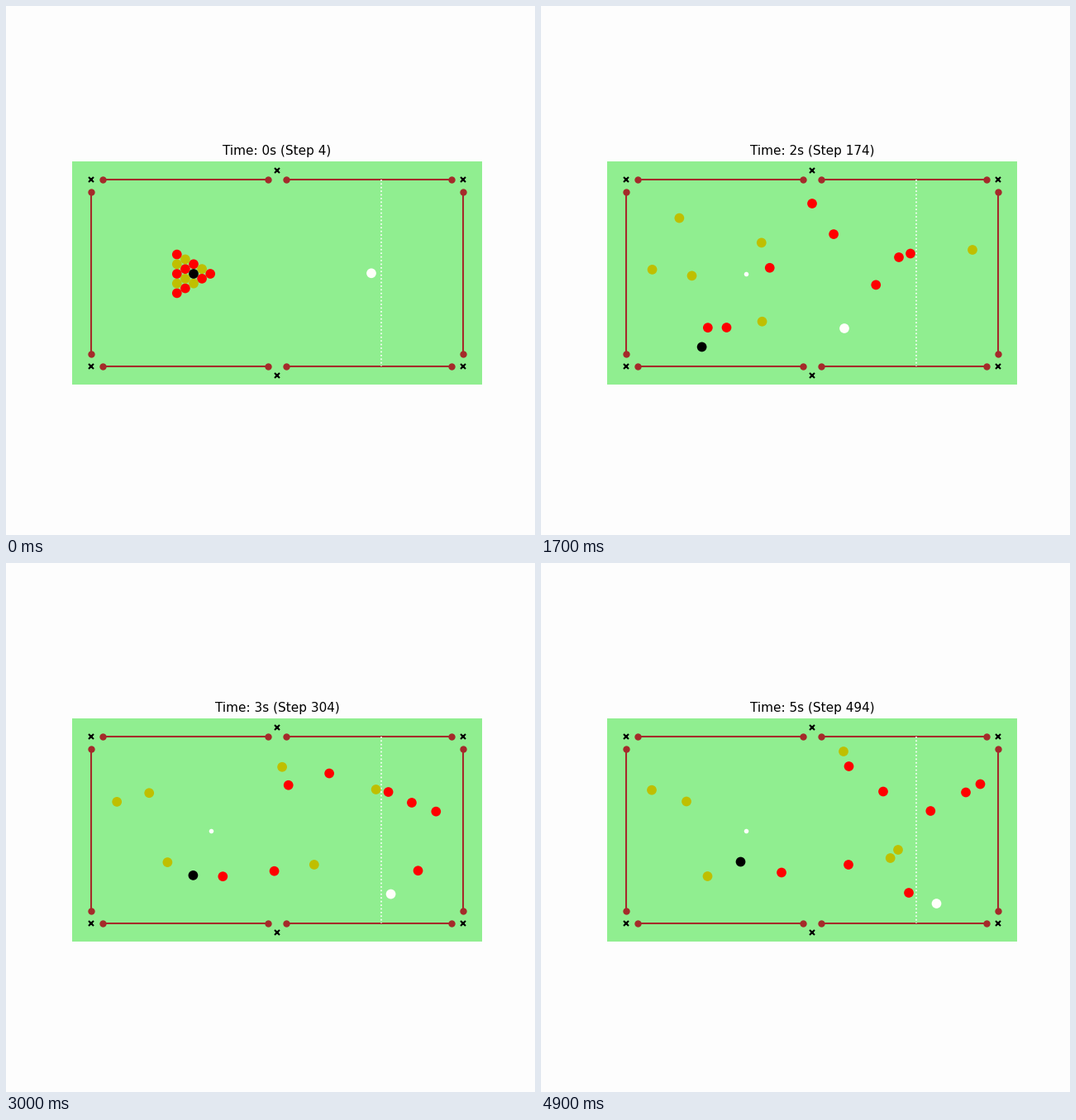
A matplotlib script for the animation above (5 s loop, 640 px wide and 640 px high).

```python
import numpy as np
import matplotlib.pyplot as plt
from matplotlib.animation import FuncAnimation
from matplotlib.patches import Circle

FRAMES, INTERVAL = 50, 100
DRAG = 0.73                  # exponential slow-down per second
BREAK, SPREAD, END = 0.2, 1.0, 4.9
RADIUS = 5.85
CX, CY = 328, 323.2          # table centre
HALF_W, HALF_H = 225.45, 112.73
MARGIN = 22.55
CORNER, MIDDLE = 14.9, 11.3  # pocket openings
RED, YELLOW, BLACK, WHITE = "red", "#bfbf00", "black", "#fffffa"

fig = plt.figure(figsize=(6.4, 6.4), dpi=100, facecolor="#fdfdfd")
width, height = 2 * (HALF_W + MARGIN), 2 * (HALF_H + MARGIN)
left, top = CX - width / 2, CY - height / 2
ax = fig.add_axes([left / 640, 1 - (top + height) / 640,
                   width / 640, height / 640])
ax.set(xlim=(left, left + width), ylim=(top + height, top),
       xticks=[], yticks=[], facecolor="lightgreen")
ax.spines[:].set_visible(False)
title = ax.set_title("", fontsize=11, fontfamily="DejaVu Sans")


def rail(xs, ys):
    ax.plot(xs, ys, "-o", color="brown", lw=1.5, ms=5, zorder=2)


for side in (-1, 1):
    x, y = CX + side * HALF_W, CY + side * HALF_H
    rail([x, x], [CY - HALF_H + CORNER, CY + HALF_H - CORNER])
    for half in (-1, 1):
        rail([CX + half * MIDDLE, CX + half * (HALF_W - CORNER)], [y, y])
    pockets = [CX - HALF_W, CX, CX + HALF_W], [y, y + side * MIDDLE, y]
    ax.plot(*pockets, "x", color="black", ms=4, mew=1.5, zorder=3)

ax.plot([454, 454], [CY - HALF_H, CY + HALF_H], ":", color="white", lw=1.2)
ax.plot(247.5, 324, "o", color="white", ms=4, mew=0)


def glide(t):
    """Distance scale on which a rolling ball moves uniformly."""
    return 1 - np.exp(-DRAG * np.asarray(t))


balls = []


def add_ball(color, points):
    """Points are (glide, x, y); the ball runs straight between them."""
    patch = Circle(points[0][1:], RADIUS, color=color, lw=0, zorder=4)
    ax.add_patch(patch)
    balls.append((patch, *np.array(points).T))


def timed(t, x, y):
    return glide(t), x, y


def last_cushion(spread, after):
    """Trace a ball back from the spread to its latest cushion contact."""
    s = spread[0]
    pos = np.array(spread[1:])
    velocity = (np.array(after[1:]) - pos) / (after[0] - s)
    room = np.array([HALF_W, HALF_H]) - RADIUS
    wall = np.array([CX, CY]) - np.sign(velocity) * room
    back = min((pos - wall) / velocity)
    back = min(back, s - glide(BREAK) - 0.08)
    return (s - back, *(pos - back * velocity))


def add_racked(color, row, col, spread, *later):
    home = timed(BREAK, 247.2 - 10.1 * row, 324 + 11.7 * (col - row / 2))
    path = [timed(SPREAD, *spread), *(timed(*p) for p in later)]
    add_ball(color, [home, last_cushion(*path[:2]), *path])


# Rack slot, place after the break, later contacts and resting place.
add_racked(RED, 0, 0, (200, 423), (1.7, 224.5, 389), (END, 372, 365))
add_racked(RED, 1, 1, (312, 389), (END, 531.5, 267.5))
add_racked(RED, 2, 0, (321, 240), (1.7, 447, 299.5), (2.29, 547, 348),
           (END, 445, 399))
add_racked(RED, 3, 1, (282, 307), (1.7, 433, 304), (2.53, 547, 301),
           (END, 471.3, 300))
add_racked(RED, 3, 3, (206, 369), (END, 372.5, 246))
add_racked(RED, 4, 0, (236, 275), (END, 514, 277.5))
add_racked(RED, 4, 2, (204, 316), (1.7, 328, 239), (1.85, 351, 216),
           (END, 414, 276.5))
add_racked(RED, 4, 4, (136, 400), (END, 291, 374.5))

add_racked(YELLOW, 1, 0, (345.5, 264), (1.57, 547, 290), (1.7, 522, 295),
           (2.36, 460, 216), (END, 432, 347))
add_racked(YELLOW, 2, 2, (135, 351.5), (END, 134, 274.7))
add_racked(YELLOW, 3, 0, (168.5, 287.5), (END, 201.5, 379))
add_racked(YELLOW, 3, 2, (153, 400), (END, 422.7, 357))
add_racked(YELLOW, 4, 1, (161, 233), (END, 176, 288.5))
add_racked(YELLOW, 4, 3, (193.5, 329.5), (END, 366, 228))

add_racked(BLACK, 2, 1, (155, 415.5), (1.32, 178, 430.5), (END, 241.5, 361.5))

cue_path = [(0, 442, 323.3), (BREAK, 258.5, 324), (SPREAD, 225.5, 312),
            (1.7, 367, 390), (2.06, 423, 430), (3.4, 476.5, 393),
            (4.23, 478.5, 429.5), (END, 478.5, 412)]
add_ball(WHITE, [timed(*p) for p in cue_path])


def update(frame):
    now = glide(frame * INTERVAL / 1000)
    for patch, s, x, y in balls:
        patch.center = np.interp(now, s, x), np.interp(now, s, y)
    step = 4 + 10 * frame
    title.set_text(f"Time: {step / 100:.0f}s (Step {step})")
    return [title, *(ball[0] for ball in balls)]


anim = FuncAnimation(fig, update, frames=FRAMES, interval=INTERVAL,
                     repeat=True, repeat_delay=0, blit=False)
plt.show()
```
